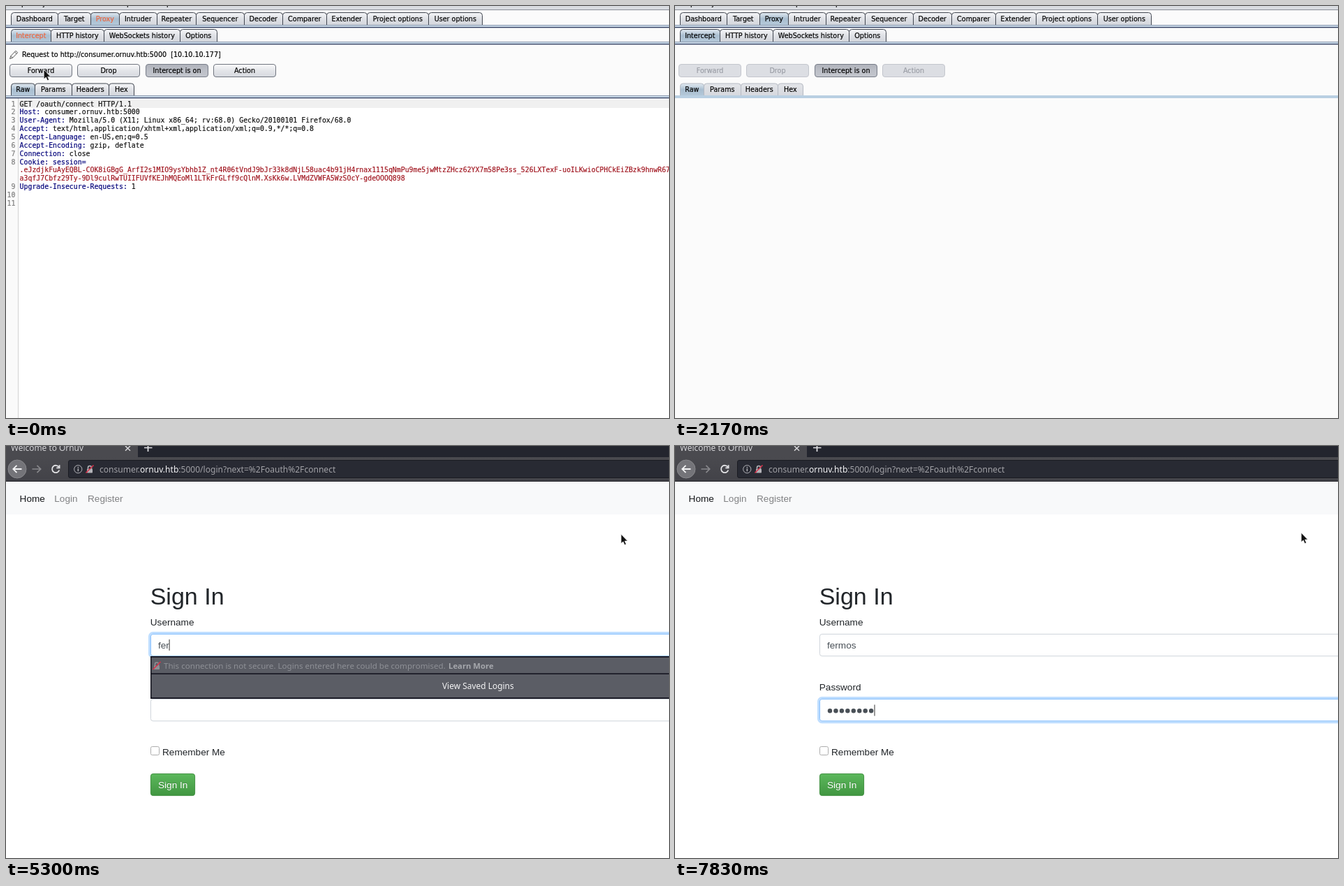
Write an HTML page that moves like this. It is 950x590 px and loops after 8000 ms.

```html
<!DOCTYPE html>
<html lang="en">
<head>
<meta charset="utf-8">
<title>Intercepted login</title>
<style>
html, body { margin: 0; width: 100%; height: 100%; overflow: hidden; background: #fff; }
svg { display: block; width: 950px; height: 590px; }
text { white-space: pre; }
.ui { font: 9.6px "DejaVu Sans", sans-serif; color: #000; }
.mono { font: 9.87px "DejaVu Sans Mono", monospace; color: #111; }
.ui, .mono, .mono tspan { fill: currentColor; stroke: currentColor; stroke-width: .18px; }
.page { font: 13.6px "Liberation Sans", Arial, sans-serif; fill: #212529; }
.bar { font: 12.05px "Noto Sans", sans-serif; fill: #a2a2a7; }
.key { color: #00007a; }
.val { color: #a0141e; }
.num { color: #7c7c7c; }
.off { color: #9a9da5; }
.hot .active { color: #f0653c; }
</style>
</head>
<body>
<svg id="stage" viewBox="0 0 950 590" xmlns="http://www.w3.org/2000/svg"></svg>
<script>
const LOOP = 8000;
const stage = document.getElementById('stage');
const $ = id => document.getElementById(id);

// ---------- drawing helpers ----------
const rect = (x, y, w, h, fill, more = '') =>
  `<rect x="${x}" y="${y}" width="${w}" height="${h}" fill="${fill}" ${more}/>`;
const text = (x, y, cls, s, more = '') => `<text x="${x}" y="${y}" class="${cls}" ${more}>${s}</text>`;
const span = (cls, s) => `<tspan class="${cls}">${s}</tspan>`;
const path = (d, stroke, w = 1, more = '') =>
  `<path d="${d}" stroke="${stroke}" stroke-width="${w}" fill="none" ${more}/>`;
const group = (id, body, more = '') => `<g id="${id}" ${more}>${body}</g>`;
const gradient = (id, ...colors) =>
  `<linearGradient id="${id}" x2="0" y2="1">${colors.map((c, i) =>
    `<stop offset="${i / (colors.length - 1)}" stop-color="${c}"/>`).join('')}</linearGradient>`;
const middle = 'text-anchor="middle"';

const defs = `<defs>
  ${gradient('tab', '#f5f6f8', '#dfe1e6', '#d3d6dc')}
  ${gradient('tabOn', '#e2eaf1', '#a9bed0', '#b4c8d9')}
  ${gradient('tabOff', '#e3e5e9', '#d6d8de')}
  ${gradient('button', '#fbfbfc', '#e3e5e9', '#d6d9df')}
  ${gradient('hover', '#ffffff', '#eceef1', '#e0e3e8')}
  ${gradient('pressed', '#a9adb8', '#bfc3cb')}
  ${gradient('toggled', '#b0b3bb', '#bcbfc7', '#c3c6cd')}
  ${gradient('green', '#5cb85c', '#419641')}
  ${gradient('toolbar', '#4a4a4f', '#424248')}
</defs>`;

// ---------- proxy window ----------
function tabs(edges, names, selected, y, live = true) {
  const shape = i => {
    const l = edges[i] - .5, r = edges[i + 1] - .5, t = y + .5, b = y + 18;
    const fill = i === selected ? 'tabOn' : live ? 'tab' : 'tabOff';
    return `<path d="M${l} ${b}V${t + 4}Q${l} ${t} ${l + 4} ${t}H${r - 4}Q${r} ${t} ${r} ${t + 4}V${b}"
      fill="url(#${fill})" stroke="${live ? '#414650' : '#b5bac3'}"/>`;
  };
  return names.map((name, i) => shape(i) +
    text((edges[i] + edges[i + 1]) / 2 - .7, y + 12.6, i === selected && y < 60 ? 'ui active' : 'ui', name, middle)).join('');
}
const divider = (y, live = true) => live
  ? rect(0, y, 950, 1, '#8d9bb0') + rect(0, y + 1, 950, 2, '#c9d9e8') + rect(0, y + 3, 950, 1.3, '#2f3c5e')
  : rect(0, y, 950, 4, '#b9cfe2');

function button(x, label, kind, id = '') {
  const fill = { on: 'url(#button)', toggled: 'url(#toggled)', off: '#dcdee3' }[kind];
  const line = { on: '#70757f', toggled: '#777c88', off: '#c3c6cd' }[kind];
  return rect(x + .5, 83.5, 89, 18, fill, `rx="3.5" stroke="${line}" ${id && `id="${id}"`}`) +
    text(x + 45, 95.8, kind === 'off' ? 'ui off' : 'ui', label, middle);
}
function controls(live) {
  const kind = live ? 'on' : 'off';
  return button(5, 'Forward', kind, live ? 'forward' : '') + button(102, 'Drop', kind) +
    button(200, 'Intercept is on', 'toggled') + button(297, 'Action', kind) +
    tabs([8, 42, 95, 148, 184], ['Raw', 'Params', 'Headers', 'Hex'], 0, 110.5, live) + divider(128, live);
}

const headers = [
  ['Host', 'consumer.ornuv.htb:5000'],
  ['User-Agent', 'Mozilla/5.0 (X11; Linux x86_64; rv:68.0) Gecko/20100101 Firefox/68.0'],
  ['Accept', 'text/html,application/xhtml+xml,application/xml;q=0.9,*/*;q=0.8'],
  ['Accept-Language', 'en-US,en;q=0.5'],
  ['Accept-Encoding', 'gzip, deflate'],
  ['Connection', 'close'],
];
function request(id, first, cookie) {
  const lines = [
    first,
    ...headers.map(([k, v]) => span('key', k + ':') + ' ' + v),
    span('key', 'Cookie: session='),
    ...cookie.map(c => span('val', c)),
    span('key', 'Upgrade-Insecure-Requests:') + ' 1',
  ];
  const row = i => 143.5 + i * 11.86;
  return group(id, lines.map((s, i) => text(19.6, row(i), 'mono', s)).join('') +
    [0, 1, 2, 3, 4, 5, 6, 7, 10, 11, 12].map((r, i) =>
      text(13.4, row(r), 'mono num', i + 1, 'text-anchor="end"')).join(''));
}

const pencil = path('M5.5 75.5L7 71.5L14 64.2L16.7 66.8L9.5 74.2ZM7 71.5L9.5 74.2M12.5 65.8L15.2 68.4', '#555', 1);
const editor = rect(0, 132, 950, 458, '#fff') + rect(0, 132, 17, 458, '#fafafa') +
  rect(18, 134, 932, 12, '#f0f0f0') + rect(17, 132, 1, 458, '#d2d2d2');

const proxy = group('proxy',
  rect(0, 0, 950, 590, '#fbfbfb') + rect(0, 0, 950, 5, '#d9dce1') + rect(0, 5, 950, 1, '#8b8f98') +
  [[22, 'p'], [53, 'j'], [173, 'p'], [230, 'p']].map(([x, s]) => text(x, -.5, 'ui', s)).join('') +
  divider(27) +
  tabs([8, 75, 122, 163, 217, 273, 342, 397, 460, 518, 606, 683],
    ['Dashboard', 'Target', 'Proxy', 'Intruder', 'Repeater', 'Sequencer', 'Decoder', 'Comparer',
      'Extender', 'Project options', 'User options'], 2, 9) +
  divider(51) +
  tabs([8, 65, 141, 250, 303], ['Intercept', 'HTTP history', 'WebSockets history', 'Options'], 0, 33) +
  group('idle', controls(false)) +
  group('held', editor + controls(true) + pencil +
    text(23, 73, 'ui', 'Request to http://consumer.ornuv.htb:5000  [10.10.10.177]') +
    request('reqConnect', 'GET /oauth/connect HTTP/1.1', [
      '.eJzdjkFuAyEQBL-COK8iGBgG_ArfI2s1MIO9ysYbhb1Z_nt4R06tVndJ9bJr33k8dNjL58uac4b91jH4rnax1115q' +
      'NmPu9me5jwMtzZHcz62YX7m58Pe3ss_526LXTexF-uoILKwioCPHCkEiZBzk9hnwR67',
      'a3qfJ7Cbfz29Ty-9Dl9culRwTUIIFUVfKEJhMQEoMl1LTkFrGLff9cQlnM.XsKk6w.LVMdZVWFA5WzSOcY-gdeOOOQ898']) +
    request('reqLogin', 'GET /login?' + span('key', 'next=') + span('val', '%2Foauth%2Fconnect') + ' HTTP/1.1', [
      '.eJztjkFuAyEQBL-C5ryKYGAY8Ctyj6wVMIO9ysYbhb1Z_nt4QJ6QU6vVXVI9Ye17GXcdcPl4gjlnwJeOUW4KC7zvWoaa' +
      '_biZ7WHOw5TW5mj0-zbM9_y8wfW1_HN_ctcF1k3gApYzUZGiIuhCCey9BEypSeiz',
      'AVddbWqdWkKt_HT1_P41Mf0SbkHRdvQo1RVdJkn4GNhRI22aO7RUxV4_QJDyqkF.XsKk_w.QdFwzPDZRXzj_1IG4aA-CLwvnl0'])
  ));

// ---------- browser window ----------
const lock = (x, y, color) =>
  path(`M${x - 2.5} ${y}V${y - 2.5}a2.5 2.5 0 0 1 5 0V${y}`, color, 1.6) +
  rect(x - 4, y - .5, 8, 5.5, color, 'rx=".8"') +
  path(`M${x - 5.5} ${y + 5}L${x + 5.5} ${y - 6}`, '#d8324a', 1.6);

const chrome = rect(0, 0, 950, 16, '#23252e') + rect(0, 0, 189, 16, '#4a4a4f') +
  rect(0, 16, 950, 35, 'url(#toolbar)') + rect(0, 50, 950, 1, '#1c1c22') +
  text(7, 7, 'bar', 'Welcome to Ornuv', 'style="font-size:11.9px;fill:#d5d5d8"') +
  path('M171 0L178 6.8M178 0L171 6.8', '#d7d7da', 1.5) +
  path('M203.5 -3V8M198 2.5H209.5', '#e3e3e6', 1.7) +
  '<circle cx="16" cy="33" r="13" fill="#747479" stroke="#88888c"/>' +
  path('M22.5 33H10.5M15.5 27.8L10.3 33L15.5 38.2', '#f4f4f5', 1.8) +
  path('M37.5 33H49.5M44.5 27.8L49.7 33L44.5 38.2', '#88888c', 1.7) +
  path('M75.6 30A5.2 5.2 0 1 0 76.3 34.5M76.6 27.2V31.3H72.3', '#e3e3e6', 1.8) +
  rect(89.5, 20.5, 870, 25, '#282a33', 'rx="2.5" stroke="#1a1b22"') +
  '<circle cx="103.3" cy="33.2" r="5.6" fill="none" stroke="#b4b4b9"/>' +
  rect(102.6, 32.3, 1.5, 4, '#b4b4b9') + rect(102.6, 29.8, 1.5, 1.5, '#b4b4b9') +
  lock(120, 33.5, '#b4b4b9') +
  text(134, 38, 'bar', 'consumer.<tspan fill="#f5f5f7">ornuv.htb</tspan>:5000/login?next=%2Foauth%2Fconnect');

const field = (id, y) => rect(207.4, y + .4, 800, 31.4, '#fff', 'rx="3.4" stroke="#ced4da"') +
  group(id + 'Glow', rect(205.5, y - 1.5, 804, 35.2, 'none', 'rx="5" stroke="#bfdeff" stroke-width="3"')) +
  group(id + 'Edge', rect(207.4, y + .4, 800, 31.4, '#fff', 'rx="3.4" stroke="#80bdff"'));

const notice = y => rect(207, y, 760, 26, '#14141f') + rect(208.5, y + 1.8, 760, 22.6, '#5b5d65') +
  lock(216, y + 14, '#8e9096') +
  text(226, y + 17.6, 'bar', 'This connection is not secure. Logins entered here could be compromised.',
    'style="font-size:11.6px;fill:#8e9096"') +
  text(634, y + 17.6, 'bar', 'Learn More', 'style="font-size:11.3px;font-weight:700;fill:#a5a7ac"');

const dots = Array.from({ length: 8 }, (_, i) =>
  `<circle class="dot" cx="${222 + i * 8.45}" cy="379.2" r="3.2" fill="#495057"/>`).join('');

const web = group('web',
  rect(0, 0, 950, 590, '#fff') + chrome + rect(0, 51, 950, 47, '#f8f9fa') +
  text(19.6, 80, 'page', 'Home', 'style="fill:#16181b"') +
  text(69.3, 80, 'page', 'Login', 'style="fill:#808183"') +
  text(117, 80, 'page', 'Register', 'style="fill:#808183"') +
  text(206.7, 226.5, 'page', 'Sign In', 'style="font-size:34px"') +
  text(206.8, 257, 'page', 'Username') + field('user', 269) +
  text(206.8, 350.2, 'page', 'Password') + field('pass', 362) +
  text(218, 290, 'page', '', 'id="typed" style="fill:#495057"') + dots +
  rect(0, 0, 1, 16, '#333', 'id="caret"') +
  rect(207.5, 430.5, 12, 12, '#fff', 'rx="2" stroke="#adadad"') +
  text(224, 443.4, 'page', 'Remember Me') +
  rect(207.4, 469.4, 63.2, 31.2, 'url(#green)', 'rx="3.4" stroke="#3e8f3e"') +
  text(218, 490, 'page', 'Sign In', 'style="fill:#fff;text-shadow:0 -1px 0 rgba(0,0,0,.2)"') +
  group('userTip', rect(207, 301, 760, 61, '#14141f') + notice(301) +
    rect(208.5, 327, 760, 33.2, '#5b5d65') +
    text(676.3, 348, 'bar', 'View Saved Logins', middle + ' style="font-size:11.95px;fill:#f4f4f5"')) +
  group('passTip', notice(395)));

const pointers = group('arrow',
    '<path d="M.3 .3V13.6L3.3 10.9L5.4 15.6L7.6 14.7L5.6 10.1H9.6Z" fill="#111" stroke="#fff" stroke-opacity=".75" stroke-width=".8"/>') +
  group('beam', path('M-3 -7.5Q0 -7.5 0 -6V6Q0 7.5 -3 7.5M3 -7.5Q0 -7.5 0 -6M0 6Q0 7.5 3 7.5', '#111', 1.2));

stage.innerHTML = defs + proxy + web + pointers;

// ---------- timeline: [start, ...values], each held until the next ----------
const screens = [[0, 'reqConnect'], [630, 'idle'], [770, 'reqLogin'], [1270, 'idle'], [3030, 'web']];
const forwardLook = [[0, 'button'], [30, 'hover'], [570, 'pressed'], [770, 'hover'], [1200, 'pressed']];
const letters = [[0, 0], [5070, 2], [5300, 3], [5670, 4], [5730, 5], [5800, 6]];
const dotCount = [[0, 0], [6300, 1], [6600, 2], [6900, 3], [7030, 4], [7200, 5], [7330, 6], [7500, 7], [7630, 8]];
// border and glow strength of each field
const userFocus = [[0, 0, 0], [3830, .5, 0], [4030, 1, 1], [6000, .8, .7], [6170, .2, .2], [6300, 0, 0]];
const passFocus = [[0, 0, 0], [6000, .3, .2], [6170, .8, .8], [6300, 1, 1]];
const pointer = [
  [0, 54, 91], [700, 56, 91], [2000, 275, 8], [2100, 491, 2], [2170, -50, -50],
  [3470, 408, 184], [3540, 372, 222], [3600, 334, 255], [3670, 310, 285],
  [4030, 458, 187], [4270, 821, 136], [4430, 838, 133], [4630, 856, 130], [4830, 866, 129],
  [5070, 874, 128], [5300, 881, 126], [5500, 886, 126], [5670, 890, 125], [5800, 894, 125], [6170, 897, 124],
];
const at = (table, t) => table.findLast(row => row[0] <= t).slice(1);

const show = (el, on) => { el.style.display = on ? '' : 'none'; };
const dotEls = [...document.querySelectorAll('.dot')];

function pointerAt(t) {
  if (t < 1270 || t >= 2000) return at(pointer, t);
  const k = Math.floor((t - 1270) / 66.7) * 66.7 / 730;   // sweep towards the top edge
  const e = k ** 1.6;
  return [56 + 219 * e, 91 - 83 * e];
}

function focus(id, [edge, glow]) {
  $(id + 'Edge').style.opacity = edge;
  $(id + 'Glow').style.opacity = glow;
}

function render(t) {
  const [screen] = at(screens, t);
  const held = screen.startsWith('req');
  show($('proxy'), screen !== 'web');
  show($('web'), screen === 'web');
  show($('idle'), screen === 'idle');
  show($('held'), held);
  show($('reqConnect'), screen === 'reqConnect');
  show($('reqLogin'), screen === 'reqLogin');
  $('proxy').classList.toggle('hot', held);
  $('forward').setAttribute('fill', `url(#${at(forwardLook, t)[0]})`);

  focus('user', at(userFocus, t));
  focus('pass', at(passFocus, t));
  show($('userTip'), t >= 4030 && t < 5930);
  show($('passTip'), t >= 6000 && t < 7830);

  const typed = $('typed'), [n] = at(letters, t), [d] = at(dotCount, t);
  typed.textContent = 'fermos'.slice(0, n);
  dotEls.forEach((dot, i) => show(dot, i < d));
  const inPass = t >= 6000, caret = $('caret');
  show(caret, t >= 3830);
  caret.setAttribute('x', inPass ? 218 + d * 8.45 - .1 : 217.7 + (n ? typed.getComputedTextLength() : 0));
  caret.setAttribute('y', inPass ? 370.5 : 277);

  const [x, y] = pointerAt(t), beam = t >= 3670 && t < 4030;
  show($('beam'), beam);
  show($('arrow'), !beam && !(t >= 2170 && t < 3470));
  $(beam ? 'beam' : 'arrow').setAttribute('transform', `translate(${x} ${y})`);
}

const start = performance.now();
function tick() {
  render((performance.now() - start) % LOOP);
  requestAnimationFrame(tick);
}
tick();
</script>
</body>
</html>
```
